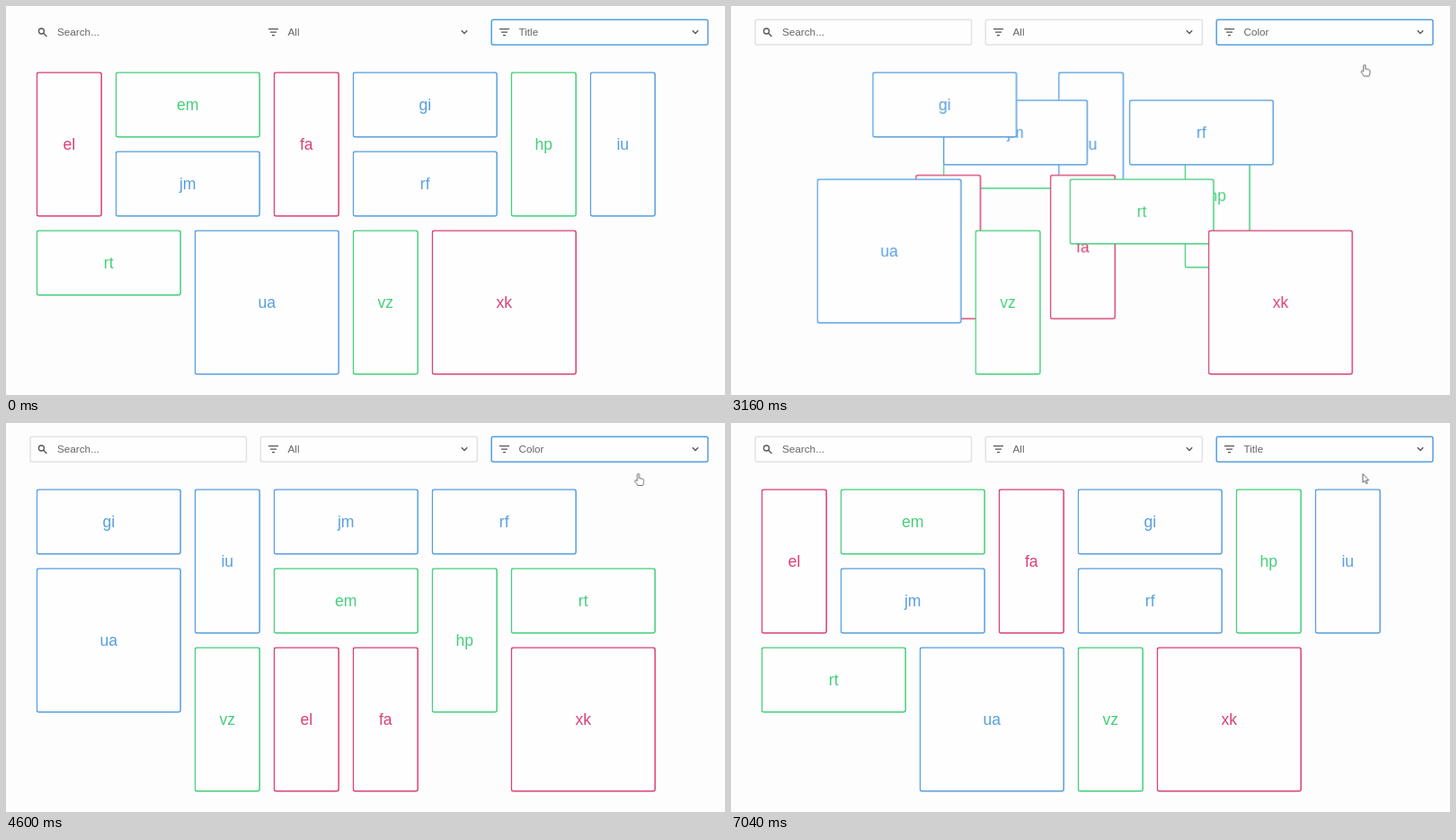
These frames come from a looping animation (800x433 px, 7880 ms). An HTML page:

```html
<!DOCTYPE html>
<html lang="en">
<head>
<meta charset="utf-8">
<title>Sortable grid</title>
<style>
  html, body { margin: 0; width: 100%; height: 100%; overflow: hidden; background: #fdfdfe; }
  svg { display: block; width: 100%; height: 100%; font-family: "Liberation Sans", Arial, sans-serif; }
  .field { fill: #fefefe; stroke: #e2e2e6; stroke-width: 1.5; }
  .focus { stroke: #559fe0; }
  .bar text { font-size: 11.73px; fill: #666; }
  .icon { fill: none; stroke: #555; stroke-width: 1.3; }
  .item rect { fill: #fefefe; stroke: currentColor; stroke-width: 1.5; }
  .item text { font-size: 17.6px; fill: currentColor; text-anchor: middle; }
  .blue { color: #589fe0; }
  .green { color: #45cf7b; }
  .pink { color: #d84274; }
  .pointer path { fill: #fff; stroke: #666; stroke-width: 1; stroke-linejoin: round; }
</style>
</head>
<body>
<svg viewBox="0 0 800 433">
  <defs>
    <path id="filter" d="M0 25.7h11M2 29.2h7M4 32.7h3"/>
    <path id="chevron" d="M-3.2 27.3L0 30.5L3.2 27.3"/>
  </defs>
  <g class="bar">
    <g id="outlines">
      <rect class="field" x="27" y="15.2" width="240.5" height="28" rx="2"/>
      <rect class="field" x="283.3" y="15.2" width="241" height="28" rx="2"/>
    </g>
    <rect class="field focus" x="540.2" y="15.2" width="240.8" height="28" rx="2"/>
    <g class="icon">
      <circle cx="39.4" cy="28" r="3"/>
      <path d="M41.6 30.2L45.4 34"/>
      <use href="#filter" x="292"/>
      <use href="#filter" x="549"/>
      <use href="#chevron" x="510"/>
      <use href="#chevron" x="767"/>
    </g>
    <text x="57" y="33">Search...</text>
    <text x="313.5" y="33">All</text>
    <text x="570.5" y="33" id="title">Title</text>
    <text x="570.5" y="33" id="color">Color</text>
  </g>
  <g id="grid"></g>
  <g class="pointer" id="pointer">
    <path id="hand" d="M-2.2 1.5V-5.4a1.1 1.1 0 0 1 2.2 0V-1.4L3.6-.8Q5-.5 5 .9V2.6Q5 4.6 3.8 6.6H-1.8Q-2.6 4.8-4.8 2.4Q-5.2.6-3.8.5Z"/>
    <path id="arrow" d="M-2.5-5.5V4.2L-.3 2.2L1.2 5.6L2.7 5L1.3 1.7H4.2Z"/>
  </g>
</svg>
<script>
const LOOP = 7880, CELL = 88, UNIT = 73.3, LEFT = 33.6, TOP = 73.3;
const byId = id => document.getElementById(id);

// label, colour, columns, rows, [column, row] by title, [column, row] by colour; back to front
const items = [
  ['em', 'green', 2, 1, [1, 0], [3, 1]],
  ['hp', 'green', 1, 2, [6, 0], [5, 1]],
  ['iu', 'blue', 1, 2, [7, 0], [2, 0]],
  ['jm', 'blue', 2, 1, [1, 1], [3, 0]],
  ['el', 'pink', 1, 2, [0, 0], [3, 2]],
  ['ua', 'blue', 2, 2, [2, 2], [0, 1]],
  ['fa', 'pink', 1, 2, [3, 0], [4, 2]],
  ['gi', 'blue', 2, 1, [4, 0], [0, 0]],
  ['rf', 'blue', 2, 1, [4, 1], [5, 0]],
  ['rt', 'green', 2, 1, [0, 2], [6, 1]],
  ['vz', 'green', 1, 2, [4, 2], [2, 2]],
  ['xk', 'pink', 2, 2, [5, 2], [6, 2]]
];

function track(el, prop, steps, easing) {
  const last = steps[steps.length - 1][1];
  const frames = [...steps, [LOOP, last]].map(([time, value]) =>
    ({ offset: time / LOOP, [prop]: value, easing }));
  el.animate(frames, { duration: LOOP, iterations: Infinity });
}

const show = (el, ...steps) => track(el, 'opacity', steps, 'step-end');
const shift = (x, y) => `translate(${x}px, ${y}px)`;
const place = ([col, row]) => shift(LEFT + col * CELL, TOP + row * CELL);

function svg(name, attrs, parent) {
  const el = document.createElementNS('http://www.w3.org/2000/svg', name);
  for (const key in attrs) el.setAttribute(key, attrs[key]);
  return parent.appendChild(el);
}

for (const [label, color, cols, rows, byTitle, byColor] of items) {
  const w = UNIT + (cols - 1) * CELL, h = UNIT + (rows - 1) * CELL;
  const item = svg('g', { class: 'item ' + color }, byId('grid'));
  svg('rect', { x: .75, y: .75, width: w - 1.5, height: h - 1.5, rx: 2.3 }, item);
  svg('text', { x: w / 2, y: h / 2 + 6.3 }, item).textContent = label;
  const a = place(byTitle), b = place(byColor);
  track(item, 'transform', [[0, a], [3010, a], [3410, b], [6368, b], [6768, a]], 'ease');
}

show(byId('outlines'), [0, 0], [1320, 1]);
show(byId('title'), [0, 1], [3000, 0], [6400, 1]);
show(byId('color'), [0, 0], [3000, 1], [6400, 0]);
show(byId('pointer'), [0, 0], [1320, 1]);
show(byId('hand'), [0, 1], [6840, 0]);
show(byId('arrow'), [0, 0], [6840, 1]);

const path = [
  [0, 711, 48], [2999, 711, 48], [3000, 706, 71.5], [4360, 706, 71.5], [4880, 703, 53],
  [5320, 703, 53], [5640, 703, 51], [6399, 703, 51], [6400, 703, 56.5], [6600, 703, 56.5], [6840, 705.5, 62]
];
track(byId('pointer'), 'transform', path.map(([time, x, y]) => [time, shift(x, y)]), 'linear');
</script>
</body>
</html>
```
